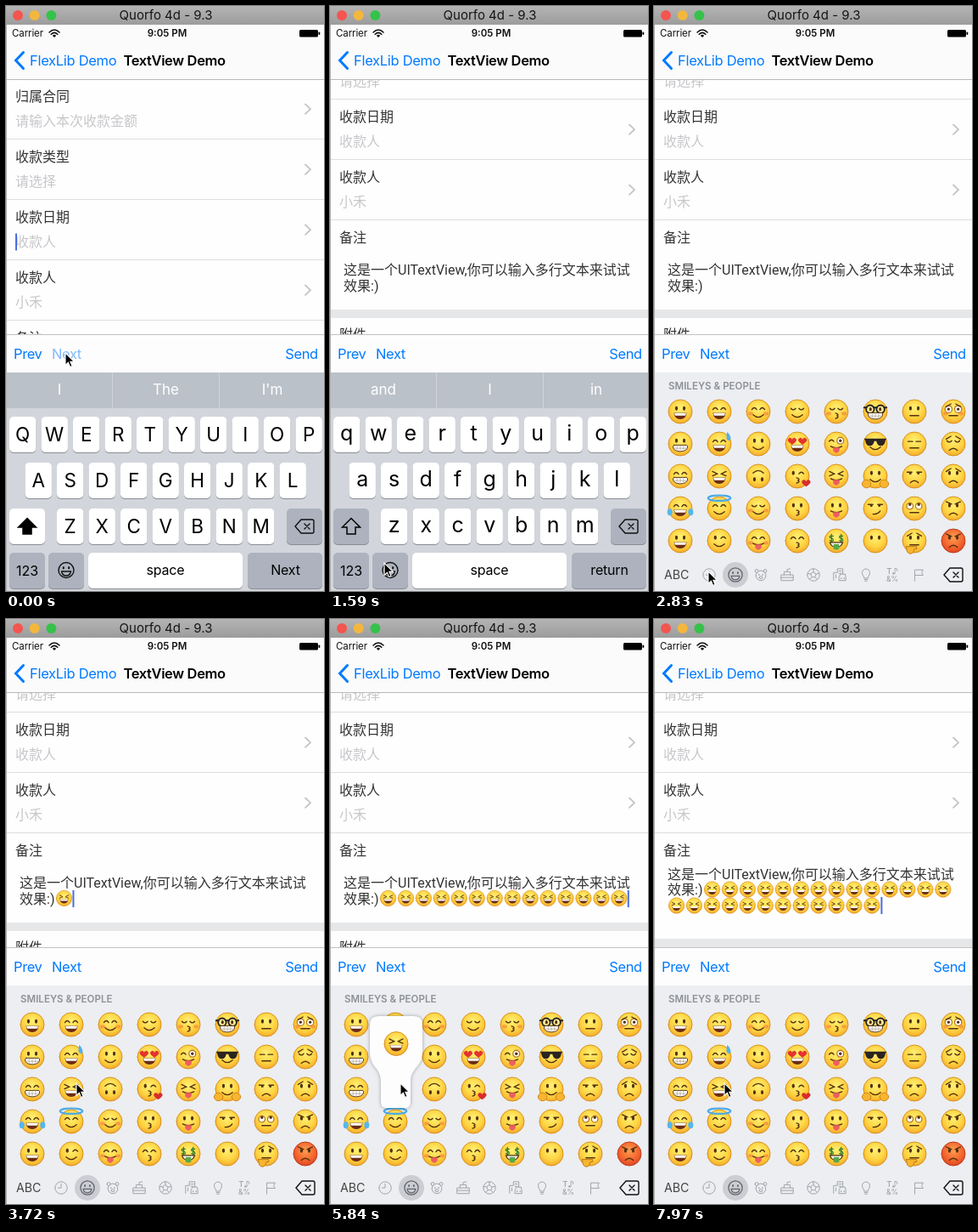
These frames come from a looping animation (375 by 688 pixels, 8000 ms). An HTML page with a canvas:

```html
<!DOCTYPE html>
<html lang="zh">
<head>
<meta charset="utf-8">
<title>TextView Demo</title>
<style>
html, body { margin: 0; width: 100%; height: 100%; overflow: hidden; background: #fff; }
canvas { display: block; width: 375px; height: 688px; }
</style>
</head>
<body>
<canvas id="stage"></canvas>
<script>
const LOOP = 8000, STEP = 177.2;
const LATIN = 'Inter, "Noto Sans CJK SC", "Noto Sans CJK", sans-serif';
const MIXED = 'Roboto, "Noto Sans CJK SC", "Noto Sans CJK", sans-serif';
const BLUE = '#007aff', CARET = '#4a6ee0', INK = '#54300f', GREY = '#a0a3a8';

const canvas = document.getElementById('stage');
const c = canvas.getContext('2d');
const dpr = window.devicePixelRatio || 1;
canvas.width = 375 * dpr;
canvas.height = 688 * dpr;

// ---- helpers ----
function rect(x, y, w, h, fill) {
  c.fillStyle = fill;
  c.fillRect(x, y, w, h);
}

function round(x, y, w, h, r, fill) {
  c.beginPath();
  c.roundRect(x, y, w, h, r);
  c.fillStyle = fill;
  c.fill();
}

function shape(d, fill, stroke, width = 1.4) {
  const p = new Path2D(d);
  if (fill) { c.fillStyle = fill; c.fill(p); }
  if (stroke) { c.strokeStyle = stroke; c.lineWidth = width; c.stroke(p); }
}

function at(x, y, scale, draw) {
  c.save();
  c.translate(x, y);
  c.scale(scale, scale);
  draw();
  c.restore();
}

// y is the middle of the capital letters
function text(s, x, y, size, color, { align = 'left', weight = 400, gap = 0, family = LATIN } = {}) {
  c.font = `${weight} ${size}px ${family}`;
  c.letterSpacing = gap + 'px';
  c.textAlign = align;
  c.fillStyle = color;
  c.fillText(s, x, y + size * 0.37);
}

const oval = (x, y, rx, ry = rx) =>
  `M${x - rx} ${y}a${rx} ${ry} 0 1 0 ${2 * rx} 0a${rx} ${ry} 0 1 0 ${-2 * rx} 0`;
const pair = (x, y, rx, ry) => oval(-x, y, rx, ry) + oval(x, y, rx, ry);
const heart = (x, y) => `M${x} ${y + 4}q-9-6-3.5-8.5q2.5-.5 3.5 2q1-2.5 3.5-2q5.5 2.5-3.5 8.5z`;

// ---- emoji: one letter for eyes, one for mouth, then extras ----
const dots = pair(4.8, -4, 1.7, 2.6), OPEN = 'M-8 1.5H8Q7 9.5 0 9.5Q-7 9.5-8 1.5Z';
const eyes = {
  o: [[dots, INK]],
  '^': [['M-8-2.5Q-5-7-2-2.5M2-2.5Q5-7 8-2.5', 0, INK]],
  u: [['M-8-4Q-5-.5-2-4M2-4Q5-.5 8-4', 0, INK]],
  x: [['M-8.5-6L-2.5-3L-8.5-.5M8.5-6L2.5-3L8.5-.5', 0, INK]],
  '-': [['M-8-3H-2M2-3H8', 0, INK]],
  w: [[oval(-5, -4, 1.7, 2.6), INK], ['M2-3Q5-7 8-3', 0, INK]],
  z: [['M-9-3Q-6-7-3-3', 0, INK], [oval(5, -4, 4.2), '#fff', '#b87a20'], [oval(5, -4, 1.8), INK]],
  h: [[heart(-6.5, -3) + heart(6.5, -3), '#e3342f']],
  W: [[pair(6, -3, 4.4), '#fff', '#b87a20'], [pair(6, -3, 1.8), INK]],
  r: [[pair(5.5, -3, 4), '#fff', '#b87a20'], [pair(5.5, -5, 1.8), INK]],
  a: [['M-9-5H-3M3-5H9', 0, INK], [pair(5, -3.5, 1.5), INK]],
  g: [[pair(6.5, -3, 5), '#fff6', '#222', 2], [pair(6, -3, 1.6, 2.3), INK], ['M-2-5H2M-14-5H-11M11-5H14', 0, '#222', 2]],
  s: [['M-14-6.5H14L12.5-4Q11.5 2.5 7 2.5Q2.5 2.5 1.3-3.5H-1.3Q-2.5 2.5-7 2.5Q-11.5 2.5-12.5-4Z', '#2b2420']],
  $: [['M-4-6Q-9-7-8-4Q-3-3-4 0Q-6 1-8-.5M-6-8V2M8-6Q3-7 4-4Q9-3 8 0Q6 1 4-.5M6-8V2', 0, '#2f7d33']]
};
const mouths = {
  D: [[OPEN, '#6b2c14'], ['M-7.4 1.8H7.4L6.4 5H-6.4Z', '#fff']],
  T: [['M-8 1.5H8Q10 2.5 8.5 6Q6 9.5 0 9.5Q-6 9.5-8.5 6Q-10 2.5-8 1.5Z', '#fff', INK, 1], ['M-8 5.5H8M-4 2V9M0 2V9M4 2V9', 0, '#a99a88', .7]],
  ')': [['M-6.5 4Q0 10 6.5 4', 0, INK]],
  '(': [['M-5 8Q0 3 5 8', 0, INK]],
  '-': [['M-5.5 5H5.5', 0, INK]],
  k: [['M-1 2Q4 3.5 1 5.2Q4 7-1 8.5', 0, INK]],
  p: [['M-7 3Q0 7 7 3', 0, INK], ['M-4 4.5V8.5Q0 14 4 8.5V4.5Z', '#ee5e60']],
  "'": [['M-3 7Q4 7 6 3', 0, INK]],
  M: [['M-8 2H8Q6 8 0 8Q-6 8-8 2Z', '#fff', INK], ['M-3.5 4V10Q0 12 3.5 10V4Z', '#58a84c']],
  _: []
};
const extras = {
  b: [[pair(9.5, 2.5, 3.2, 2.2), '#f4703a88']],
  s: [['M10-15Q17-7 12.5-4Q7-4 10-15Z', '#4fb0ee']],
  h: [[heart(11, 9), '#d82c2c']],
  H: [[pair(11, 9.5, 5.5, 5), '#f8b52f', '#cf8416', 1]],
  A: [[oval(0, -13, 14, 3.4), 0, '#4aa9e6', 2.2]],
  t: [[pair(13, 4.5, 3.2, 4.2), '#55b6f0']],
  B: [['M-9-8.5L-2-5.5M9-8.5L2-5.5', 0, INK]],
  S: [['M-9-6L-3-9.5M9-6L3-9.5', 0, INK]],
  K: [['M-10 7H3V10H0Q-1 16-5 16Q-10 16-10 7Z', '#f8b52f', '#c07714', 1]]
};
const grid = [
  'oD ^D ^)b u) ukb gT o- W-bS',
  'oT ^Ds o) hD zp s) -- u(S',
  '^T xD o)f wkh xp o)H a( o(S',
  "^Dt ^)A u)b ok op a' r- o(B",
  "oD w) ^pb ^k $M o_ o-KS o(BR"
].map(row => row.split(' '));

function emoji(x, y, r, code) {
  const more = code.slice(2);
  const [light, mid, low, rim] = more.includes('R')
    ? ['#fb9a4e', '#f4672f', '#dd4522', '#b9391a'] : ['#ffee70', '#fed341', '#f4a92a', '#d58a1c'];
  at(x, y, r / 14, () => {
    const glow = c.createRadialGradient(0, -4, 1, 0, -3, 17);
    glow.addColorStop(0, light);
    glow.addColorStop(.6, mid);
    glow.addColorStop(1, low);
    shape(oval(0, 0, 13.6), glow, rim, .9);
    if (more.includes('f')) c.scale(1, -1);
    at(0, 0, .92, () => {
      const layers = [...eyes[code[0]], ...mouths[code[1]]];
      for (const e of more) layers.push(...(extras[e] || []));
      for (const layer of layers) shape(...layer);
    });
  });
}

// ---- screen parts ----
function drawTop() {
  const bar = c.createLinearGradient(0, 0, 0, 22);
  bar.addColorStop(0, '#b4b4b4');
  bar.addColorStop(1, '#9c9c9c');
  rect(0, 0, 375, 22, bar);
  ['#f4554f', '#f4b73e', '#35c24a'].forEach((color, i) => shape(oval(14 + 19.7 * i, 11, 6), color));
  text('Quorfo 4d - 9.3', 188.5, 10.5, 15, '#151515', { align: 'center' });

  rect(0, 22, 375, 64, '#fbfbfb');
  text('Carrier', 7, 32, 11.5, '#111', { gap: -.1 });
  shape('M51 31Q57 25 63 31M53.2 33.2Q57 29.5 60.8 33.2', 0, '#111', 1.6);
  shape('M57 37L54.8 34.7Q57 33 59.2 34.7Z', '#111');
  text('9:05 PM', 190, 32, 11.5, '#111', { align: 'center', weight: 600 });
  round(346, 28, 22, 8.5, 1.5, '#000');
  round(368.5, 30.5, 1.8, 3.5, 1, '#000');
  shape('M20.5 54.5L11.5 64L20.5 73.5', 0, BLUE, 3);
  text('FlexLib Demo', 28, 64, 16.5, BLUE, { gap: -.3 });
  text('TextView Demo', 138.5, 64, 16.5, '#000', { weight: 600, gap: -.35 });
  rect(0, 86, 375, 1, '#b9b9bb');
}

const rows = [['归属合同', '请输入本次收款金额'], ['收款类型', '请选择'], ['收款日期', '收款人'], ['收款人', '小禾']];

function drawForm(k, scroll, count) {
  const cjk = { family: MIXED }, dark = '#333';
  const wrapped = count > 14, advance = 20.95;
  const caret = (x, y) => {
    if (k < 9 || k > 17 || Math.floor(k / 3) % 2 === 0) rect(x, y - 10, 2, 20, CARET);
  };
  c.save();
  c.beginPath();
  c.rect(0, 87, 375, 299);
  c.clip();
  c.translate(0, -scroll);
  rows.forEach(([title, hint], i) => {
    const y = 71 * i;
    text(title, 11, 106 + y, 16, dark, cjk);
    text(hint, 11, 135.5 + y, 16, '#c7c7cb', cjk);
    shape(`M353 ${115.5 + y}l6 5.7l-6 5.7`, 0, '#c4c4c8', 1.8);
    rect(0, 156 + y, 375, 1, '#dedede');
  });
  text('备注', 11, 390, 16, dark, cjk);
  const [y1, y2] = wrapped ? [418, 436.5] : [428, 447];
  text('这是一个UITextView,你可以输入多行文本来试试', 16, y1, 16, dark, cjk);
  text('效果:)', 16, y2, 16, dark, cjk);
  for (let i = 0; i < count; i++) {
    const second = i > 13;
    emoji((second ? 16.5 + advance * (i - 14) : 58.5 + advance * i) + 10, second ? 455 : y2 - .5, 9.5, 'xD');
  }
  rect(0, wrapped ? 494 : 475, 375, 10, '#e6e7e8');
  text('附件', 11, wrapped ? 523 : 504, 16, dark, cjk);

  if (k < 1) caret(11, 277.5);
  else if (k < 4) caret(11, 348.5);
  else if (wrapped) caret(16 + advance * (count - 14), 455);
  else caret(57.5 + advance * count, y2);
  c.restore();
}

function drawTools(k) {
  rect(0, 386, 375, 45, '#fdfdfd');
  rect(0, 386, 375, 1, '#c3c3c5');
  const tint = { 0: .5, 3: .35, 4: .4, 5: .6 }[k] || 1;
  text('Prev', 9, 409, 16.5, BLUE, { gap: -.4 });
  c.globalAlpha = tint;
  text('Next', 54, 409, 16.5, BLUE, { gap: -.4 });
  c.globalAlpha = 1;
  text('Send', 367.8, 409, 16.5, BLUE, { gap: -.4, align: 'right' });
}

function key(x, y, w, fill = '#fff') {
  round(x, y + 1, w, 42, 5, '#898c91');
  round(x, y, w, 42, 5, fill);
}

function deleteIcon() {
  shape('M341 612L348 604H361Q363 604 363 606V618Q363 620 361 620H348Z', 0, '#111', 1.4);
  shape('M352 609L358 615M358 609L352 615', 0, '#111', 1.4);
}

function drawKeys(k) {
  const upper = k < 4, dark = '#adb2be', mid = { align: 'center' };
  rect(0, 431, 375, 257, '#d2d5db');
  rect(0, 431, 375, 42, '#bbc1c9');
  rect(125, 431, 1, 42, '#cfd4da');
  rect(251, 431, 1, 42, '#cfd4da');
  const words = k < 5 ? ['I', 'The', "I'm"] : k < 6 ? ['an', 'T', 'Ih'] : ['and', 'I', 'in'];
  c.globalAlpha = k === 5 ? .65 : 1;
  words.forEach((w, i) => text(w, 63 + 125.5 * i, 450.5, 17, '#fff', mid));
  c.globalAlpha = 1;

  [['qwertyuiop', 19.7], ['asdfghjkl', 38.2], ['zxcvbnm', 75.7]].forEach(([letters, x0], r) => {
    const y = 483 + 54 * r;
    [...letters].forEach((ch, i) => {
      const x = x0 + 37.5 * i;
      key(x - 15.7, y, 31.4);
      if (upper) text(ch.toUpperCase(), x, y + 21, 22.5, '#000', mid);
      else text(ch, x, y + 19, 25, '#000', mid);
    });
  });
  key(4, 591, 42, upper ? '#fff' : dark);
  shape('M25 602.5L35.5 613H30V621H20V613H14.5Z', upper ? '#000' : 0, '#000', 1.5);
  key(331, 591, 42, dark);
  deleteIcon();

  key(4, 643, 42, dark);
  text('123', 25, 664, 16, '#000', mid);
  key(50, 643, 42, dark);
  at(71, 663.5, 1, () => smiley('#111'));
  key(97, 643, 182);
  text('space', 188, 663, 16, '#000', { align: 'center', gap: -.2 });
  key(285, 643, 88, dark);
  text(upper ? 'Next' : 'return', 329.5, 663.5, 16, '#000', { align: 'center', gap: -.2 });
}

function smiley(color) {
  shape(oval(0, 0, 9), 0, color, 1.4);
  shape(pair(3.2, -2.8, 1.1, 1.7), color);
  shape('M-5.5 1.5H5.5Q4.5 6.5 0 6.5Q-4.5 6.5-5.5 1.5Z', 0, color, 1.3);
}

const icons = {
  65: oval(0, 0, 8) + 'M0-5V0H-4',
  126: oval(0, 1, 6.5) + oval(-5.5, -5, 2.2) + oval(5.5, -5, 2.2) + pair(2.3, 0, .5) + oval(0, 3.5, 2.2, 1.6),
  157: 'M-8 7V0H8V7ZM-8 3.5H8M-4 0V-4H4V0M0-4V-7L4-8',
  188: oval(0, 0, 8) + 'M0-3.5L3.5-1L2 3H-2L-3.5-1ZM0-8V-3.5M3.5-1L7.5-2M2 3L5 6M-2 3L-5 6M-3.5-1L-7.5-2',
  219: 'M-8 7V-3H-3V-8H4V-1M-5 0V4M-1-5H2M-1-2H2M-1 7V3L1-1H7L8 3V7Z' + oval(2, 4.5, .5) + oval(6, 4.5, .5),
  250: 'M-2.5 4Q-2.5 2-4.5 0Q-6-3-4-6Q0-9.5 4-6Q6-3 4.5 0Q2.5 2 2.5 4ZM-2 6H2M-1.5 8H1.5',
  312: 'M-5 8V-6.5H6L4-3L6 .5H-5'
};

function drawEmojiKeys(popup) {
  rect(0, 431, 375, 257, '#eceef1');
  text('SMILEYS & PEOPLE', 17, 446.5, 11.5, '#8d9095', { weight: 600, gap: .03 });
  grid.forEach((row, r) => row.forEach((code, i) => emoji(31 + 46 * i, 477 + 38 * r, 14.4, code)));

  text('ABC', 12, 668.5, 14.2, '#444');
  shape(oval(96, 669, 15), '#cbcdd2');
  at(96, 669, .9, () => smiley('#60636a'));
  for (const x in icons) at(+x, 669, .9, () => shape(icons[x], 0, GREY, 1.1));
  text('T♪', 281, 664.5, 9.5, GREY, { align: 'center', weight: 500 });
  text('&%', 281, 673.5, 8.5, GREY, { align: 'center', weight: 500 });
  at(1, 57, 1, deleteIcon);

  if (!popup) return;
  c.save();
  c.shadowColor = '#0005';
  c.shadowBlur = 4 * dpr;
  shape('M57 467H99Q109 467 109 477V508C109 529 95 526 95 545V568Q95 575 89 575H66Q60 575 60 568V545C60 526 47 529 47 508V477Q47 467 57 467Z', '#fdfdfd');
  c.restore();
  emoji(78, 499.5, 14.4, 'xD');
}

// ---- motion ----
const mousePath = [[0, 70, 408], [5, 70, 408], [6, 72, 447], [7, 66, 588], [8, 66, 588],
  [9, 64, 655], [10, 64, 665], [16, 64, 665], [19, 83, 546], [46, 83, 546]];

function drawMouse(k) {
  const i = mousePath.findIndex(p => p[0] > k);
  const [k0, x0, y0] = mousePath[i - 1], [k1, x1, y1] = mousePath[i];
  const f = (k - k0) / (k1 - k0);
  at(x0 + (x1 - x0) * f, y0 + (y1 - y0) * f, 1, () =>
    shape('M0 0V14.5L3.4 11.3L5.6 16.4L8 15.4L5.8 10.4H10.4Z', '#000', '#fff', 1.1));
}

function draw(k) {
  const t = k * STEP;
  const p = Math.min(1, Math.max(0, (t - 617) / 420));
  const scroll = Math.round(118 * p * p * (3 - 2 * p));
  // steady tapping on one emoji
  const taps = (t - 3720) / 162, phase = taps - Math.floor(taps);
  const count = taps < 0 ? 0 : Math.min(26, 1 + Math.floor(taps));
  const popup = k === 20 || (k > 20 && k < 45 && phase > .05 && phase < .5);

  c.setTransform(dpr, 0, 0, dpr, 0, 0);
  c.lineCap = 'round';
  rect(0, 0, 375, 688, '#fefefe');
  drawForm(k, scroll, count);
  drawTop();
  drawTools(k);
  if (k < 16) drawKeys(k);
  else drawEmojiKeys(popup);
  rect(0, 22, 1, 666, '#b4b4b4');
  drawMouse(k);
}

const start = performance.now();
let last = -1;
function tick() {
  const k = Math.floor(((performance.now() - start) % LOOP + 8) / STEP);
  if (k !== last) draw(last = k);
  requestAnimationFrame(tick);
}
tick();
</script>
</body>
</html>
```
